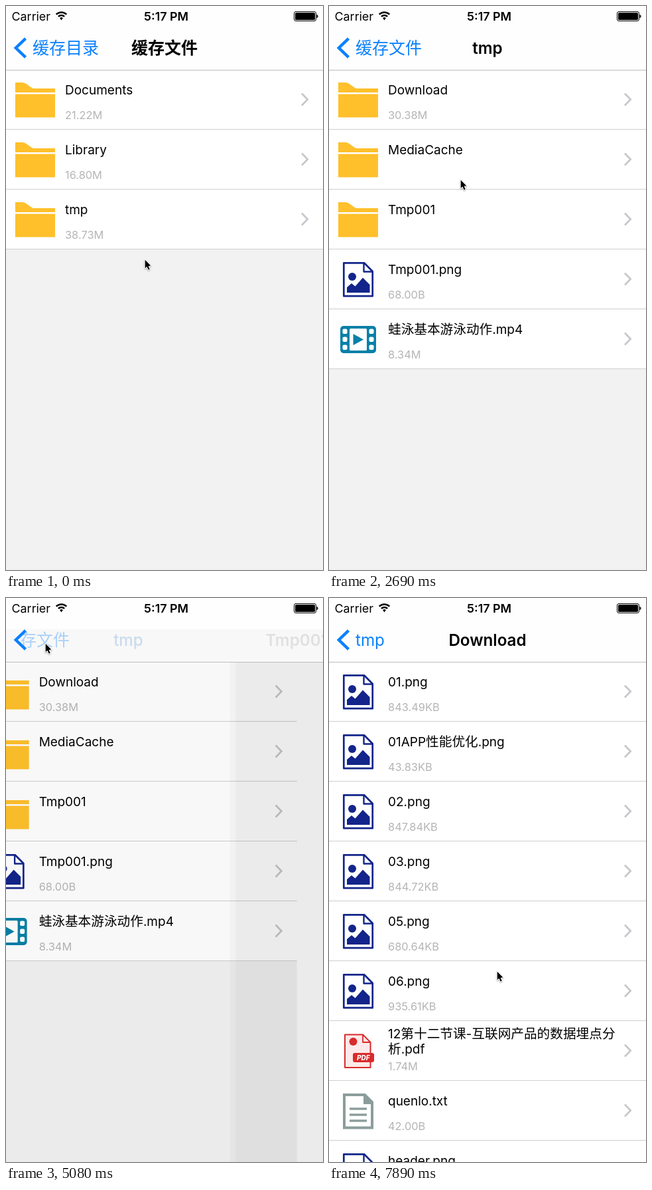
Write an HTML page with a canvas that moves like this. It is 478x848 px and loops after 8000 ms.

```html
<!DOCTYPE html>
<html lang="zh">
<head>
<meta charset="utf-8">
<title>File browser</title>
<style>
  html, body { margin: 0; width: 100%; height: 100%; overflow: hidden; background: #fff; }
  canvas { display: block; width: 478px; height: 848px; }
</style>
</head>
<body>
<canvas id="stage"></canvas>
<script>
const W = 478, H = 848, LOOP = 8000, TICK = 148.7;
const NAV_BOTTOM = 97, ROW = 90, MID = 239, BACK_X = 40, PARALLAX = 143;
const BLUE = '#0a80ff', NAVY = '#13258a', TEAL = '#0880a8', RED = '#d92b2b', SLATE = '#8b9d9b';

const canvas = document.getElementById('stage');
const c = canvas.getContext('2d');
const dpr = window.devicePixelRatio || 1;
canvas.width = W * dpr;
canvas.height = H * dpr;

const root = {
  title: '缓存文件', back: '缓存目录',
  rows: [['folder', 'Documents', '21.22M'], ['folder', 'Library', '16.80M'], ['folder', 'tmp', '38.73M']]
};
const tmp = {
  title: 'tmp', back: '缓存文件',
  rows: [
    ['folder', 'Download', '30.38M'], ['folder', 'MediaCache', ''], ['folder', 'Tmp001', ''],
    ['image', 'Tmp001.png', '68.00B'], ['video', '蛙泳基本游泳动作.mp4', '8.34M']
  ]
};
const empty = { title: 'Tmp001', back: 'tmp', rows: [] };
const download = {
  title: 'Download', back: 'tmp',
  rows: [
    ['image', '01.png', '843.49KB'], ['image', '01APP性能优化.png', '43.83KB'],
    ['image', '02.png', '847.84KB'], ['image', '03.png', '844.72KB'],
    ['image', '05.png', '680.64KB'], ['image', '06.png', '935.61KB'],
    ['pdf', '12第十二节课-互联网产品的数据埋点分\n析.pdf', '1.74M'],
    ['text', 'quenlo.txt', '42.00B'], ['image', 'header.png', '512.07KB']
  ]
};

// Times are in ticks.
const moves = [
  { at: 3.8, lower: root, upper: tmp, row: 2 },
  { at: 25.31, lower: tmp, upper: empty, row: 2 },
  { at: 33.045, lower: tmp, upper: empty, pop: true },
  { at: 41.88, lower: tmp, upper: download, row: 0 }
];
const pointer = [
  [0, 209, 381], [3, 197, 330], [4, 195, 328], [7, 195, 328], [12, 198, 288], [17, 198, 288],
  [20.5, 198, 151], [24, 197, 311], [26, 197, 311], [32, 59, 68], [34, 59, 68],
  [40, 205, 165], [42, 205, 165], [49, 59, 60], [53, 253, 561], [54, 253, 561]
];

const mix = (a, b, t) => a + (b - a) * t;

// Critically damped spring from 0 to 1.
function spring(ticks) {
  const s = Math.max(0, ticks) * 2.68;
  return 1 - (1 + s) * Math.exp(-s);
}

// Chinese runs are set slightly larger than Latin ones. Returns the width.
function text(str, x, y, size, color, weight = 400, measureOnly = false) {
  let pen = x;
  for (const run of str.match(/[\u4e00-\u9fff]+|[^\u4e00-\u9fff]+/g) || []) {
    const han = run.charCodeAt(0) >= 0x4e00;
    const family = han ? '"Noto Sans CJK SC", "Noto Sans CJK"' : 'Inter, Roboto';
    const heft = han && weight > 400 ? 700 : weight;
    c.font = `${heft} ${han ? size * 1.035 : size}px ${family}, sans-serif`;
    if (!measureOnly) {
      c.fillStyle = color;
      c.fillText(run, pen, y);
    }
    pen += c.measureText(run).width;
  }
  return pen - x;
}
const widthOf = (str, size, weight) => text(str, 0, 0, size, '', weight, true);

function rect(x, y, w, h, color) {
  c.fillStyle = color;
  c.fillRect(x, y, w, h);
}
function round(x, y, w, h, r, color) {
  c.fillStyle = color;
  c.beginPath();
  c.roundRect(x, y, w, h, r);
  c.fill();
}
function disc(x, y, r, color) {
  c.fillStyle = color;
  c.beginPath();
  c.arc(x, y, r, 0, Math.PI * 2);
  c.fill();
}
function trace(points, closed) {
  c.beginPath();
  points.forEach(([x, y]) => c.lineTo(x, y));
  if (closed) c.closePath();
}
function poly(points, color) {
  trace(points, true);
  c.fillStyle = color;
  c.fill();
}
function line(points, color, width, closed = false) {
  trace(points, closed);
  c.strokeStyle = color;
  c.lineWidth = width;
  c.stroke();
}
function withAlpha(a, draw) {
  c.save();
  c.globalAlpha = Math.min(1, Math.max(0, a));
  draw();
  c.restore();
}

// Icons are drawn relative to the top left of their row.
const icons = {
  folder() {
    const color = '#ffc02b';
    c.fillStyle = color;
    c.beginPath();
    c.moveTo(14, 19);
    c.lineTo(24, 19);
    c.bezierCurveTo(31, 19, 34, 25, 41, 28);
    c.lineTo(74, 28);
    c.lineTo(74, 34);
    c.lineTo(14, 34);
    c.fill();
    rect(14, 36.5, 60, 35, color);
  },
  image() {
    c.lineJoin = 'round';
    line([[22.3, 20.3], [53, 20.3], [65.7, 33], [65.7, 70.2], [22.3, 70.2]], NAVY, 2.7, true);
    line([[52.5, 20.3], [52.5, 33.5], [65.7, 33.5]], NAVY, 2.4);
    disc(35, 41, 6, NAVY);
    poly([[27, 65], [27, 57], [34, 51], [39.5, 55.5], [51, 42.5], [61.5, 53], [61.5, 65]], NAVY);
  },
  video() {
    round(17, 25, 54, 41, 5, TEAL);
    round(31, 29, 26, 33, 1.5, '#fff');
    for (let i = 0; i < 3; i++) {
      round(20.5, 29.5 + i * 12, 7, 7.5, 2, '#fff');
      round(60.5, 29.5 + i * 12, 7, 7.5, 2, '#fff');
    }
    poly([[36.5, 37], [52, 45.5], [36.5, 54]], TEAL);
  },
  pdf() {
    const page = [[24, 20.5], [51, 20.5], [62.5, 32], [62.5, 70], [24, 70]];
    c.lineJoin = 'round';
    poly(page, '#fde9e9');
    line(page, RED, 2, true);
    line([[51, 20.5], [51, 32], [62.5, 32]], RED, 1.8);
    disc(36.5, 31, 6, RED);
    round(36, 48, 32, 14, 3, RED);
    c.font = 'italic 800 10px Inter, sans-serif';
    c.fillStyle = '#fff';
    c.fillText('PDF', 42, 58.7);
  },
  text() {
    c.lineJoin = 'miter';
    line([[23, 21], [54, 21], [65, 32], [65, 70.5], [23, 70.5]], SLATE, 4, true);
    poly([[52, 19], [54, 19], [67, 32], [67, 35], [52, 35]], SLATE);
    for (const y of [42, 51, 60]) rect(31, y - 1.7, 26, 3.4, SLATE);
  }
};

function drawRow([icon, name, size], selected) {
  rect(0, 0, W, ROW, selected ? '#dcdcdc' : '#fff');
  icons[icon]();
  const lines = name.split('\n');
  const first = lines.length > 1 ? 26 : 37;
  lines.forEach((s, i) => text(s, 89, first + i * 23, 19, '#000'));
  text(size, 89, 73.5, 16.4, '#b5b5b5');
  c.lineJoin = 'miter';
  line([[446, 35.5], [454.7, 44.5], [446, 53.5]], '#c7c7cc', 2.7);
  rect(0, 89, W, 1, '#cfcfd1');
}

function drawPage(page, x, selected = -1) {
  c.save();
  c.translate(x, 0);
  rect(0, 0, W, H, 'rgba(0,0,0,.05)');
  page.rows.forEach((row, i) => {
    c.save();
    c.translate(0, 96 + ROW * i);
    drawRow(row, i === selected);
    c.restore();
  });
  c.restore();
}

function drawTitle(str, center, alpha) {
  withAlpha(alpha, () =>
    text(str, center - widthOf(str, 24.2, 600) / 2, 72, 24.2, '#000', 600));
}
function drawBack(str, x, alpha) {
  withAlpha(alpha, () => {
    c.beginPath();
    c.rect(23, 40, W, 50);
    c.clip();
    text(str, x, 72, 24.2, BLUE);
  });
}

function drawBar(labels) {
  rect(0, 0, W, 96, '#fefefe');
  rect(0, 96, W, 1, '#bdbdbf');
  labels();
  c.lineJoin = 'miter';
  line([[29.5, 48.8], [14.8, 63], [29.5, 77.2]], BLUE, 4.4);
}

function drawStatus() {
  text('Carrier', 8.5, 22, 17.9, '#000');
  text('5:17 PM', 208, 22, 17.9, '#000', 600);
  for (const r of [6.5, 11]) {
    c.beginPath();
    c.arc(83.5, 20.5, r, -Math.PI * 0.75, -Math.PI * 0.25);
    c.strokeStyle = '#000';
    c.lineWidth = 2.5;
    c.stroke();
  }
  c.fillStyle = '#000';
  c.beginPath();
  c.moveTo(83.5, 21.5);
  c.arc(83.5, 20.5, 3.4, -Math.PI * 0.75, -Math.PI * 0.25);
  c.fill();
  c.lineWidth = 1;
  c.beginPath();
  c.roundRect(434.5, 8.5, 33, 14, 2.5);
  c.stroke();
  round(436, 10, 30, 11, 1.5, '#000');
  round(468.5, 13, 2, 5, [0, 2, 2, 0], '#000');
}

function drawStill(page, pressed) {
  drawPage(page, 0);
  drawBar(() => {
    drawBack(page.back, BACK_X, pressed ? 0.3 : 1);
    drawTitle(page.title, MID, 1);
  });
}

function drawMove({ lower, upper, pop, row = -1 }, age) {
  const shown = t => pop ? 1 - spring(t) : spring(t);
  const q = shown(age), n = shown(age - 0.06);
  const left = W * (1 - q);

  drawPage(lower, -PARALLAX * q, row);
  rect(0, 0, W, H, `rgba(0,0,0,${0.1 * q})`);
  if (upper.rows.length) {
    const shade = c.createLinearGradient(left - 12, 0, left, 0);
    shade.addColorStop(0, 'rgba(0,0,0,0)');
    shade.addColorStop(1, `rgba(0,0,0,${0.05 + 0.17 * (1 - q)})`);
    rect(left - 12, 0, 12, H, shade);
  } else {
    rect(left - 9, 0, 9, H, 'rgba(0,0,0,.022)');
  }
  drawPage(upper, left);

  const fade = pop
    ? { back: (1 - n) ** 3, title: (1 - n) ** 8, label: n * (0.3 + 0.7 * n), next: n * n }
    : { back: 1 - Math.sqrt(n), title: 1 - Math.sqrt(n), label: n * (0.6 + 0.4 * n), next: n };
  drawBar(() => {
    if (pop) rect(0, 47, W, 49, `rgba(0,0,0,${0.07 * n})`);
    const labelWidth = widthOf(upper.back, 24.2, 400);
    const center = mix(MID, BACK_X + labelWidth / 2, n);
    drawBack(lower.back, BACK_X - PARALLAX * n, fade.back);
    drawTitle(lower.title, center, fade.title);
    drawBack(upper.back, center - labelWidth / 2, fade.label);
    drawTitle(upper.title, MID + 288 * (1 - n), fade.next);
  });
}

function drawPointer(tick) {
  const i = pointer.findIndex(p => p[0] > tick);
  const [t0, x0, y0] = pointer[i - 1], [t1, x1, y1] = pointer[i];
  const u = (tick - t0) / (t1 - t0), e = u * u * (3 - 2 * u);
  c.save();
  c.translate(mix(x0, x1, e), mix(y0, y1, e));
  const arrow = [[0.7, 0.8], [0.7, 13.2], [3.4, 10.7], [5.6, 15.6], [7.7, 14.7], [5.6, 9.9], [9.4, 9.6]];
  c.lineJoin = 'round';
  c.shadowColor = 'rgba(0,0,0,.35)';
  c.shadowBlur = 2 * dpr;
  c.shadowOffsetY = dpr;
  line(arrow, '#fff', 2, true);
  c.shadowColor = 'transparent';
  poly(arrow, '#000');
  c.restore();
}

function draw(now) {
  const tick = Math.floor((now % LOOP) / TICK);
  c.setTransform(dpr, 0, 0, dpr, 0, 0);
  rect(0, 0, W, H, '#fff');
  const move = moves.filter(m => m.at <= tick).pop();
  if (!move) drawStill(root);
  else if (tick - move.at < 2.8) drawMove(move, tick - move.at);
  else drawStill(move.pop ? move.lower : move.upper, tick === 33);
  drawStatus();
  drawPointer(tick);
}

const start = performance.now();
function loop() {
  draw(performance.now() - start);
  requestAnimationFrame(loop);
}
loop();
</script>
</body>
</html>
```
